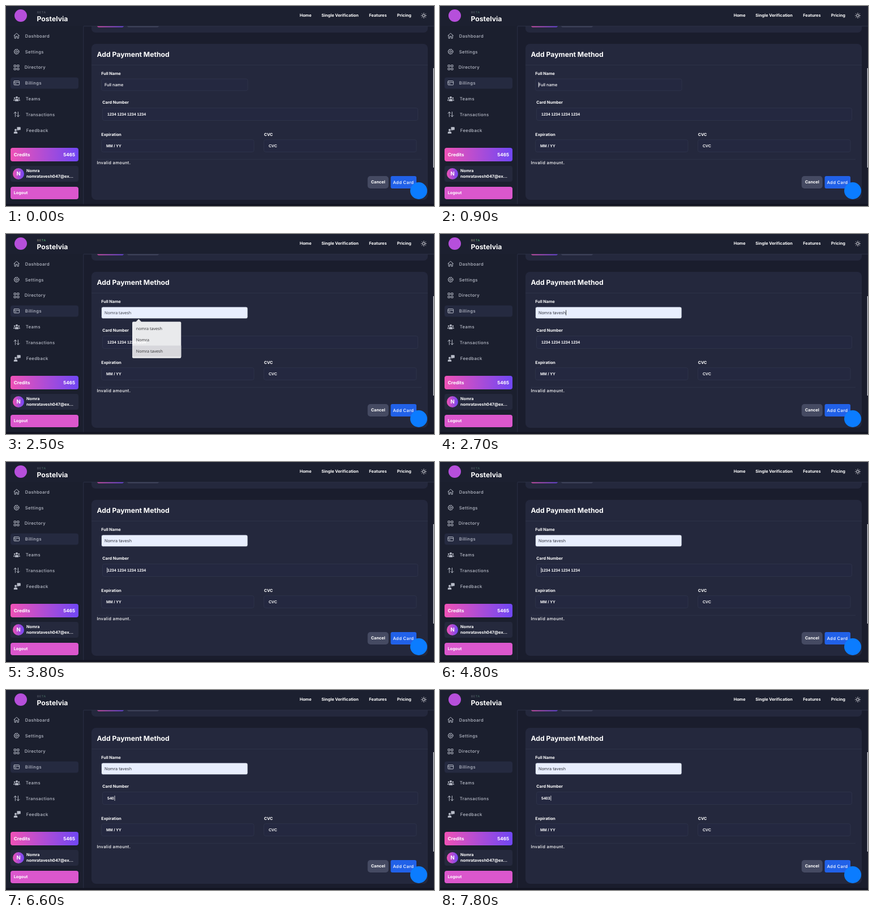
An HTML page that plays this animation: 756x354 px, repeating every 8000 ms.

```html
<!DOCTYPE html>
<html lang="en">
<head>
<meta charset="utf-8">
<title>Add payment method</title>
<style>
  html, body { margin: 0; width: 100%; height: 100%; overflow: hidden; background: #1b1f2e; }
  svg { display: block; width: 756px; height: 354px; }
  text { font: 700 7.2px Inter, sans-serif; fill: #fff; text-rendering: geometricPrecision; white-space: pre; }
  .top { font-size: 7.3px; }
  .title { font-size: 12.2px; }
  .nav { font-weight: 500; font-size: 7.7px; letter-spacing: .35px; fill: #b9bdc9; }
  .soft { font-weight: 500; font-size: 7.6px; letter-spacing: .3px; }
  .big { font-size: 8.1px; }
  .input { font-weight: 500; font-size: 7.3px; }
  .card { font: 700 7px "Liberation Sans", Arial, sans-serif; }
  .menu { font: 400 7.2px "Open Sans", sans-serif; fill: #333; }
  .beta { font-weight: 500; font-size: 5.2px; letter-spacing: .65px; }
  .icon { fill: none; stroke: #b9bdc9; stroke-width: 1; stroke-linecap: round; stroke-linejoin: round; }
  .solid { fill: #b9bdc9; stroke: none; }
  .field { fill: #242840; stroke: #30354c; stroke-width: .8; }
  .line { stroke: #30354c; stroke-width: .8; }
</style>
</head>
<body>
<svg viewBox="0 0 756 354">
  <defs>
    <linearGradient id="brand"><stop stop-color="#ef52b6"/><stop offset="1" stop-color="#7047f4"/></linearGradient>
  </defs>

  <!-- Page and top bar -->
  <rect width="756" height="354" fill="#1b1f2e"/>
  <rect x="137" y="36" width="619" height="315" fill="#1a1d2d"/>
  <path d="M151 36H745V40a7 7 0 0 1-7 7H158a7 7 0 0 1-7-7Z" fill="#24283d"/>
  <path d="M161 35H208Q208 37.6 204 37.6H165Q161 37.6 161 35Z" fill="url(#brand)"/>
  <path d="M214 35H270Q270 37.6 266 37.6H218Q214 37.6 214 35Z" fill="#454960"/>
  <rect width="756" height="35.5" fill="#1c2030"/>
  <path class="line" d="M137 35.7H756M136.8 36V351" fill="none"/>
  <rect y="350.5" width="756" height="3.5" fill="#121421"/>
  <rect x="754.7" y="110" width="1.3" height="176" fill="#d6d8df"/>
  <circle cx="26" cy="17" r="11" fill="#b64fdb"/>
  <text class="beta" x="55" y="13.2"><tspan id="betaHead">BE</tspan><tspan id="betaTail">TA</tspan></text>
  <text class="title" x="54.5" y="27">Postelvia</text>
  <text class="top" x="518.7" y="19.3">Home</text>
  <text class="top" x="557.3" y="19.3">Single Verification</text>
  <text class="top" x="641.3" y="19.3">Features</text>
  <text class="top" x="690.8" y="19.3">Pricing</text>
  <g class="icon" transform="translate(738 17)" style="stroke:#e8e9ee">
    <circle r="2.3"/>
    <path d="M0-4.6V-4M0 4V4.6M-4.6 0H-4M4 0H4.6M-3.3-3.3-2.9-2.9M2.9 2.9 3.3 3.3M-3.3 3.3-2.9 2.9M2.9-2.9 3.3-3.3"/>
  </g>

  <!-- Sidebar -->
  <rect x="8" y="126.5" width="120" height="20" rx="4" fill="#252a40"/>
  <text class="nav" x="33.8" y="55.7">Dashboard</text>
  <text class="nav" x="33.8" y="83.6">Settings</text>
  <text class="nav" x="32.8" y="111.4">Directory</text>
  <text class="nav" x="33.8" y="139.3">Billings</text>
  <text class="nav" x="34.8" y="167.1">Teams</text>
  <text class="nav" x="34.8" y="195">Transactions</text>
  <text class="nav" x="35.8" y="222.8">Feedback</text>
  <g class="icon">
    <path d="M14 52.5 18.7 48.3 23.4 52.5M15.2 51.8V57.2H17.4V53.7H20V57.2H22.2V51.8"/>
    <circle cx="18.7" cy="80.8" r="1.7"/>
    <circle cx="18.7" cy="80.8" r="4"/>
    <circle cx="18.7" cy="80.8" r="4.5" stroke-dasharray="1.4 2.13" stroke-linecap="butt"/>
    <path d="M14.5 104.5h3v3h-3zM20 104.5h3v3h-3zM14.5 110h3v3h-3zM20 110h3v3h-3z"/>
    <rect x="14" y="132.6" width="9.6" height="7.2" rx="1"/>
    <path d="M14 135.2H23.6M15.8 137.7H18"/>
    <path d="M16.4 196V187.5M14 190 16.4 187.5 18.8 190M21.4 187.5V196M19 193.6 21.4 196 23.8 193.6"/>
  </g>
  <g class="solid">
    <circle cx="19" cy="161.8" r="1.9"/>
    <circle cx="15.2" cy="163" r="1.3"/>
    <circle cx="22.8" cy="163" r="1.3"/>
    <path d="M15.8 168.5V167q0-2.4 3.2-2.4T22.2 167v1.5ZM13 167.5q0-2.6 2.5-2.5l-.6 2.5ZM25 167.5q0-2.6-2.5-2.5l.6 2.5Z"/>
    <circle cx="17" cy="219.5" r="1.9"/>
    <path d="M13.8 225.7V224q0-2 3.2-2T20.2 224v1.7ZM19.5 214.3h5.3q1 0 1 1v3.2q0 1-1 1h-2.6l-1.7 1.6v-1.6h-1Z"/>
  </g>
  <rect x="8" y="251" width="120" height="24" rx="4" fill="url(#brand)"/>
  <text class="big" x="13.8" y="266.1">Credits</text>
  <text class="big" x="122" y="266.1" text-anchor="end">5465</text>
  <rect x="8" y="283" width="120" height="28" rx="4" fill="#25293d"/>
  <circle cx="22" cy="297" r="10" fill="url(#brand)"/>
  <text x="22" y="300.4" text-anchor="middle" style="font-size:9.5px">N</text>
  <text x="36" y="294.3">Nomra</text>
  <text x="36" y="303.8">nomratavesh047@ex...</text>
  <rect x="8" y="320" width="120" height="22" rx="4" fill="#db57cd"/>
  <text x="13.8" y="333.3">Logout</text>

  <!-- Payment form -->
  <rect x="151" y="67" width="594" height="276" rx="8" fill="#24283d"/>
  <path class="line" d="M151 104.5H745M160.5 271.3H734"/>
  <text class="title" x="160.5" y="90.3">Add Payment Method</text>
  <text x="168.3" y="122.2">Full Name</text>
  <text x="170.3" y="173.2">Card Number</text>
  <text x="168.3" y="229.6">Expiration</text>
  <text x="455.7" y="229.6">CVC</text>
  <rect id="nameField" class="field" x="168.5" y="129" width="258.5" height="20.8" rx="3"/>
  <rect class="field" x="170.5" y="180.5" width="557" height="22" rx="3"/>
  <rect class="field" x="168.5" y="236.7" width="269.5" height="21.6" rx="3"/>
  <rect class="field" x="455.5" y="236.7" width="269.5" height="21.6" rx="3"/>
  <text id="name" class="input" x="174" y="141.8"></text>
  <text id="number" class="card" x="179" y="193.6"></text>
  <text class="card" x="177" y="250">MM / YY</text>
  <text class="card" x="464" y="250">CVC</text>
  <rect id="nameCaret" y="134.7" width=".8" height="9.2"/>
  <rect id="numberCaret" y="187" width=".8" height="9" fill="#fff"/>
  <text class="soft" x="160.5" y="279.9">Invalid amount.</text>
  <rect x="638.7" y="301" width="37" height="22" rx="5" fill="#454a62"/>
  <text x="657.2" y="314.3" text-anchor="middle" style="font-size:7.4px">Cancel</text>
  <rect x="679.5" y="301" width="45.5" height="22" rx="3" fill="#2161e8"/>
  <text class="soft" x="683.4" y="314.8" style="font-size:7.7px">Add Card</text>
  <circle cx="729" cy="327" r="15" fill="#0b7cff"/>

  <!-- Suggestions -->
  <g id="menu">
    <path d="M229 155.7 234.3 150.5 239.6 155.7Z" fill="#fff"/>
    <rect x="223" y="155.3" width="86.3" height="64.4" rx="2" fill="#fff"/>
    <rect id="hover" x="223" y="197.5" width="86.3" height="19.5" fill="#ebebed"/>
    <text class="menu" x="229.8" y="170.4">nomra tavesh</text>
    <text class="menu" x="229.8" y="190.2">Nomra</text>
    <text class="menu" x="229.8" y="210.2">Nomra tavesh</text>
  </g>
</svg>
<script>
const LOOP = 8000, BLINK = 500;
const el = id => document.getElementById(id);
const [nameField, nameText, number, nameCaret, numberCaret, menu, hover, betaHead, betaTail] =
  ["nameField", "name", "number", "nameCaret", "numberCaret", "menu", "hover", "betaHead", "betaTail"].map(el);

// Moments of the interaction, in ms
const at = { focusName: 900, openMenu: 1000, hover: 1900, preview: 2000, fade: 2500, fill: 2700, focusNumber: 3800 };
const keys = [[6100, "5"], [6500, "54"], [6600, "540"], [7800, "5403"]];

const show = (node, on) => node.setAttribute("visibility", on ? "visible" : "hidden");
const blinkOn = since => since >= 0 && Math.floor(since / BLINK) % 2 === 0;

function draw(t) {
  const preview = t >= at.preview, filled = t >= at.fill;
  nameField.style.fill = preview ? "#e8eefe" : "";
  nameText.textContent = preview ? "Nomra tavesh" : "Full name";
  nameText.setAttribute("class", preview && !filled ? "menu" : "input");
  nameText.style.fill = preview ? "#30333d" : "";
  nameText.style.fontWeight = preview ? 400 : "";

  const firstCaret = t < at.hover && blinkOn(t - at.focusName);
  const lastCaret = filled && t < at.fill + BLINK;
  show(nameCaret, firstCaret || lastCaret);
  nameCaret.setAttribute("x", filled ? 174.3 + nameText.getComputedTextLength() : 173.8);
  nameCaret.setAttribute("fill", filled ? "#111" : "#fff");

  show(menu, t >= at.openMenu && !filled);
  menu.setAttribute("opacity", t < at.fade ? 1 : t < at.fade + 100 ? .9 : .4);
  hover.setAttribute("opacity", t >= at.hover ? 1 : 0);

  const key = keys.filter(([time]) => time <= t).pop();
  number.textContent = key ? key[1] : "1234 1234 1234 1234";
  numberCaret.setAttribute("x", key ? 179.9 + number.getComputedTextLength() : 178.4);
  show(numberCaret, blinkOn(t - (key ? key[0] : at.focusNumber)));

  const bright = t >= at.fade && t < 3000;
  betaHead.style.fill = bright ? "#8d8a78" : "#565b68";
  betaTail.style.fill = bright ? "#4fae6c" : t < at.focusName ? "#565b68" : "#44685f";
}

function tick() {
  draw(performance.now() % LOOP);
  requestAnimationFrame(tick);
}
tick();
</script>
</body>
</html>
```
